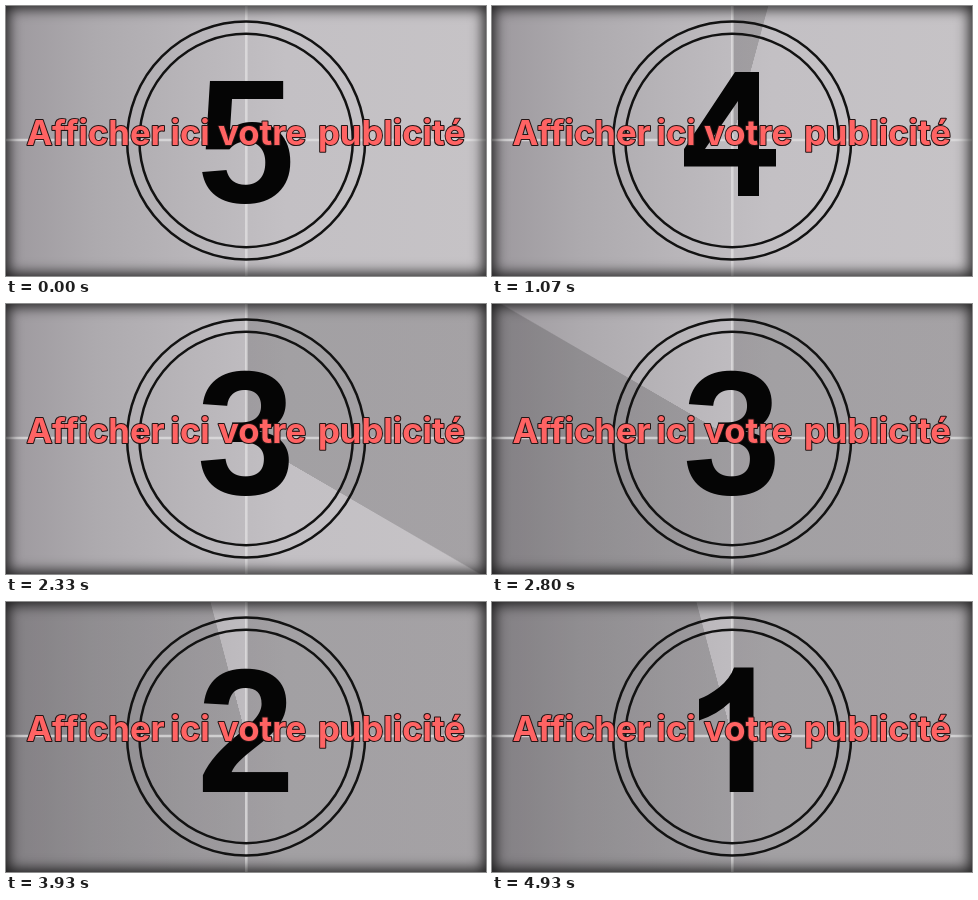
Write an HTML page that moves like this. It is 480 px wide and 270 px high and loops after 4.99 s.

```html
<!DOCTYPE html>
<html lang="fr">
<head>
<meta charset="utf-8">
<title>Compte à rebours</title>
<style>
  html, body { margin: 0; width: 100%; height: 100%; overflow: hidden; background: #000; }
  #stage { position: relative; width: 480px; height: 270px; overflow: hidden; }
  #stage > * { position: absolute; inset: 0; }
  #film { background: linear-gradient(90deg, #9d999e, #adaaae 90px, #bab7bb 200px, #c3c0c4 280px, #c6c3c6); }
  #sweep {
    --a: 0deg;
    background: conic-gradient(at 240px 134px, rgba(0, 0, 0, .17) var(--a), transparent calc(var(--a) + .3deg));
  }
  #edge { box-shadow: inset 0 0 13px 3px rgba(0, 0, 0, .8); }
  svg { width: 480px; height: 270px; }
  .cross { stroke: #e2e1e2; stroke-width: 2.6; opacity: .75; }
  .ring { fill: none; stroke: #121212; stroke-width: 2.5; }
  #digit { font: 700 177px "Liberation Sans", Arial, sans-serif; text-anchor: middle; }
  #digit, #four, #one { fill: #050505; }
  #title {
    font: 700 34.7px Inter, sans-serif;
    fill: #ff6363; stroke: #241414; stroke-width: 2; stroke-linejoin: round; paint-order: stroke;
  }
</style>
</head>
<body>
<div id="stage">
  <div id="film"></div>
  <div id="sweep"></div>
  <svg viewBox="0 0 480 270">
    <path class="cross" d="M0 134H480M240.3 0V270"/>
  </svg>
  <div id="edge"></div>
  <svg viewBox="0 0 480 270">
    <circle class="ring" cx="240.1" cy="134.5" r="119"/>
    <circle class="ring" cx="240.1" cy="134.5" r="106.7"/>
    <text id="digit" x="240" y="196">5</text>
    <path id="four" d="M246 190V160.5H192V143L243 66H267V143H284V160.5H267V190ZM246 143V95L213 143Z" visibility="hidden"/>
    <path id="one" d="M261.5 190H237.7V100.5Q225 112.7 207 118.5V97Q216 94 227 85.5T242 65.6H261.5Z" visibility="hidden"/>
    <text id="title" y="138.7"><tspan x="20.5">Afficher </tspan><tspan x="164.5">ici </tspan><tspan x="212">votre </tspan><tspan x="312">publicité</tspan></text>
  </svg>
</div>
<script>
  const LOOP = 4990, FRAME = 1000 / 15, PER_DIGIT = 15;
  const SPEED = 25.4, DELAY = 0.41, NOTCH = 15;
  const [sweep, digit, four, one] =
    ["sweep", "digit", "four", "one"].map(id => document.getElementById(id));

  const show = (el, on) => el.setAttribute("visibility", on ? "visible" : "hidden");

  function draw(time) {
    const frame = Math.floor((time % LOOP + 4) / FRAME);
    const value = 5 - Math.floor(frame / PER_DIGIT);
    // the hand advances in notches
    const turn = Math.max(0, (frame % PER_DIGIT - DELAY) * SPEED);
    const angle = Math.round(turn / NOTCH) * NOTCH;

    sweep.style.setProperty("--a", angle + "deg");
    sweep.style.visibility = angle ? "visible" : "hidden";
    digit.textContent = value;
    digit.setAttribute("y", value === 5 ? 196 : 190);
    show(four, value === 4);
    show(one, value === 1);
    show(digit, value !== 4 && value !== 1);
  }

  const start = performance.now();
  function tick() {
    draw(performance.now() - start);
    requestAnimationFrame(tick);
  }
  tick();
</script>
</body>
</html>
```
